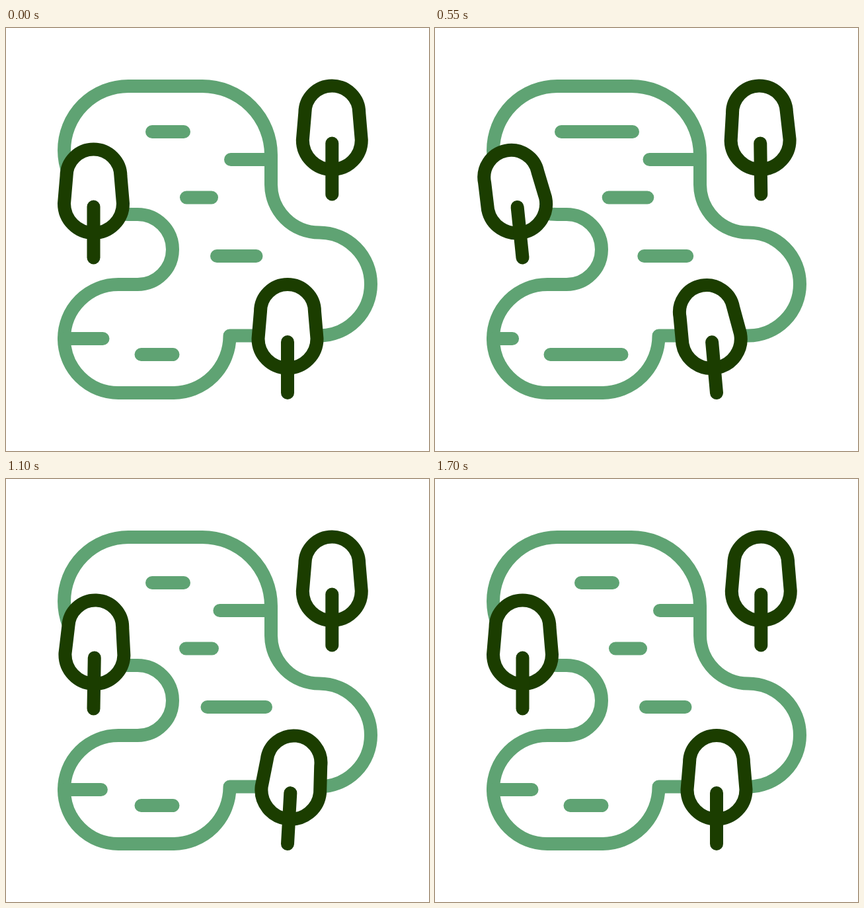
Animation of 640 by 640 pixels, one loop 1750 ms. Source, as an HTML page:

```html
<!DOCTYPE html>
<html lang="en">
<head>
<meta charset="utf-8">
<title>Pond with swaying trees</title>
<style>
  html, body { margin: 0; width: 100%; height: 100%; overflow: hidden; background: #fff; }
  svg { display: block; width: 100%; height: 100%; }
  path { stroke-width: 20; stroke-linecap: round; stroke-linejoin: round; }
  .water { fill: none; stroke: #5fa373; }
  .tree { fill: #fff; stroke: #1b3d00; }
</style>
</head>
<body>
<svg viewBox="0 0 640 640">
  <path class="water" d="M185 88H297A104 104 0 0 1 401 192V237A73 73 0 0 0 474 309.500
    A78 78 0 0 1 474 465.500H338.500A86 86 0 0 1 252 552H170A82 82 0 0 1 170 388H199
    A53 53 0 0 0 199 282H185A97 97 0 0 1 185 88Z"/>
  <g id="ripples" class="water"></g>
  <g id="trees" class="tree"></g>
</svg>
<script>
const LOOP = 1750, FRAME = 50;

// Each ripple spans x1..x2 at y; its ends move by d1 and d2 at the peak of its start/peak/end times.
const ripples = [
  { y: 157,   x1: 221,   x2: 269,   d1: -30,   d2: 30,   times: [30, 550, 1070] },
  { y: 494,   x1: 204.5, x2: 252.5, d1: -30,   d2: 30,   times: [30, 550, 1070] },
  { y: 470,   x1: 88,    x2: 146.5, d1: 0,     d2: -30,  times: [100, 600, 1230] },
  { y: 256.5, x1: 273,   x2: 311,   d1: -10.5, d2: 10.5, times: [100, 600, 1230] },
  { y: 199,   x1: 340,   x2: 401,   d1: -33,   d2: 0,    times: [310, 807, 1395] },
  { y: 345,   x1: 319,   x2: 378.5, d1: -16.8, d2: 16.8, times: [390, 965, 1490] }
];

const trees = [
  { x: 493.3, y: 251.5, delay: 0 },
  { x: 132.5, y: 347.5, delay: 160 },
  { x: 426,   y: 552,   delay: 300 }
];

// [time, degrees]
const sway = [[0, 0], [340, -6], [360, -6], [715, 3.3], [770, 3.3], [1040, 0]];

function add(parent, tag, attrs = {}) {
  const node = document.createElementNS('http://www.w3.org/2000/svg', tag);
  for (const name in attrs) node.setAttribute(name, attrs[name]);
  return parent.appendChild(node);
}

// cubic-bezier(.42, 0, .58, 1)
function easeInOut(p) {
  let low = 0, high = 1, u = 0.5;
  for (let i = 0; i < 16; i++) {
    u = (low + high) / 2;
    const x = 1.26 * u * (1 - u) ** 2 + 1.74 * u * u * (1 - u) + u ** 3;
    if (x < p) low = u; else high = u;
  }
  return u * u * (3 - 2 * u);
}

function valueAt(keys, t) {
  if (t <= keys[0][0]) return keys[0][1];
  for (let i = 1; i < keys.length; i++) {
    const [t0, v0] = keys[i - 1], [t1, v1] = keys[i];
    if (t < t1) return v0 + (v1 - v0) * easeInOut((t - t0) / (t1 - t0));
  }
  return keys[keys.length - 1][1];
}

for (const r of ripples) {
  r.keys = r.times.map((time, i) => [time, i % 2]);
  r.node = add(document.getElementById('ripples'), 'path');
}

for (const tree of trees) {
  tree.node = add(document.getElementById('trees'), 'g');
  tree.crown = add(tree.node, 'path', {
    d: 'M-41-123A41 41 0 0 1 41-123L44.500-82A44.500 44.500 0 0 1-44.500-82Z'
  });
  add(tree.node, 'path', { d: 'M0-77V0' });
}

function draw(t) {
  for (const r of ripples) {
    const k = valueAt(r.keys, t);
    r.node.setAttribute('d', `M${r.x1 + r.d1 * k} ${r.y}H${r.x2 + r.d2 * k}`);
  }
  for (const tree of trees) {
    const angle = valueAt(sway, t - tree.delay);
    tree.node.setAttribute('transform', `translate(${tree.x} ${tree.y}) rotate(${angle})`);
    // The crown bends further around the top of the trunk.
    tree.crown.setAttribute('transform', `rotate(${angle} 0 -77)`);
  }
}

const start = performance.now();
function tick() {
  const t = (performance.now() - start) % LOOP;
  draw(Math.floor(t / FRAME) * FRAME);
  requestAnimationFrame(tick);
}
tick();
</script>
</body>
</html>
```
